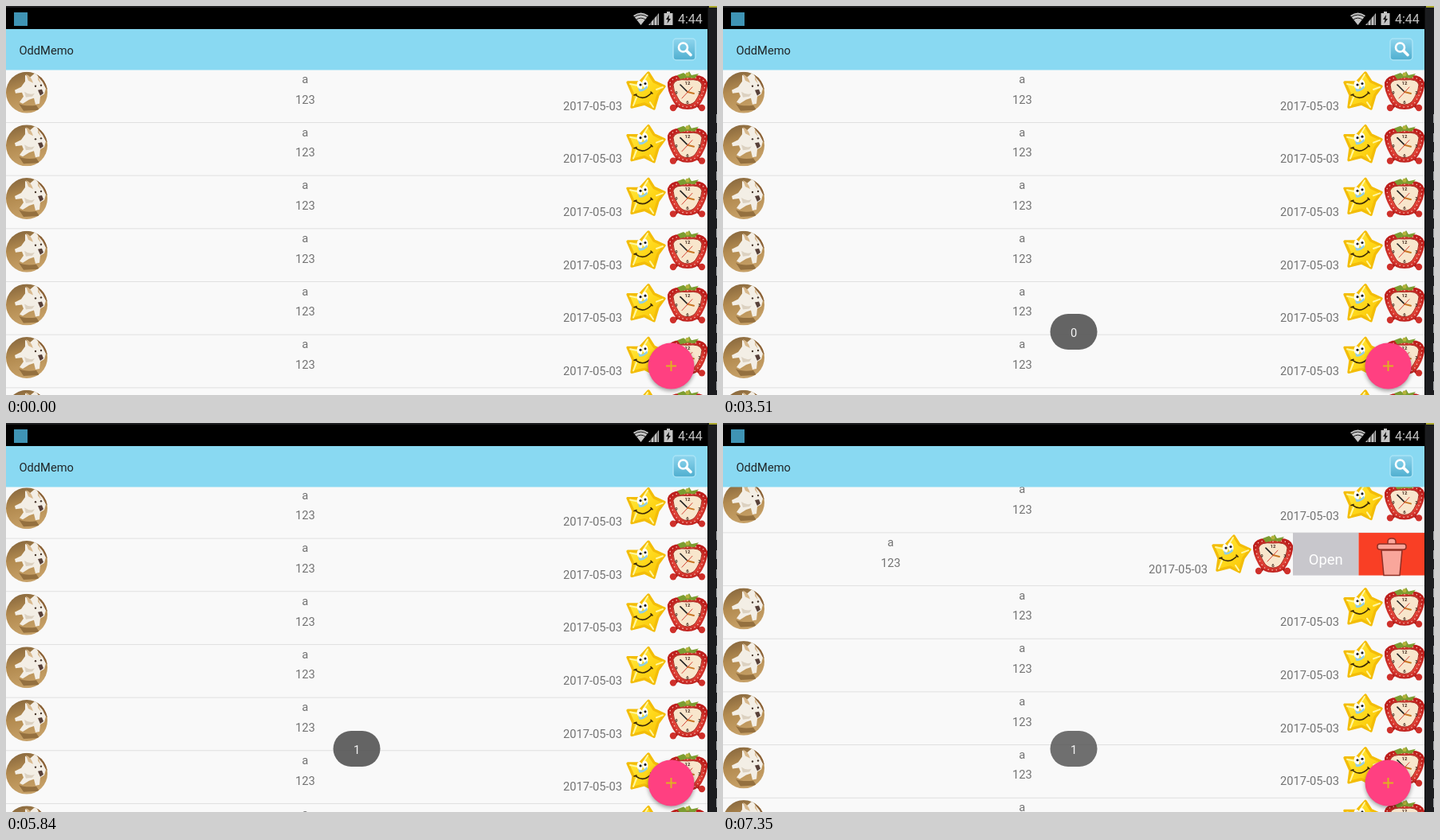
These frames come from a looping animation (892x489 px, 7990 ms). An HTML page:

```html
<!DOCTYPE html>
<html lang="en">
<head>
<meta charset="utf-8">
<title>Note list</title>
<style>
html, body { margin: 0; width: 100%; height: 100%; overflow: hidden; background: #1b1c1f; }
svg { display: block; width: 100%; height: 100%; }
text { font-family: Roboto, Arial, sans-serif; font-size: 14.67px; }
.mid { text-anchor: middle; }
.line { fill: none; stroke-linecap: round; stroke-linejoin: round; }
</style>
</head>
<body>
<svg viewBox="0 0 892 489">
<defs>
  <linearGradient id="ground" x2=".3" y2="1"><stop stop-color="#80613a"/><stop offset=".5" stop-color="#b38b50"/><stop offset="1" stop-color="#c6a067"/></linearGradient>
  <linearGradient id="gold" x2="1" y2="1"><stop stop-color="#ffec4a"/><stop offset=".5" stop-color="#ffd91c"/><stop offset="1" stop-color="#f8c000"/></linearGradient>
  <linearGradient id="glass" x2="0" y2="1"><stop stop-color="#8fd6ee"/><stop offset="1" stop-color="#4faecf"/></linearGradient>
  <radialGradient id="red"><stop offset=".6" stop-color="#e8493c"/><stop offset="1" stop-color="#bd1f1c"/></radialGradient>
  <filter id="soft" x="-30%" y="-30%" width="160%" height="160%"><feGaussianBlur stdDeviation="2.5"/></filter>
  <clipPath id="disc"><circle cx="26" cy="26" r="26"/></clipPath>

  <g id="dog" clip-path="url(#disc)">
    <rect width="52" height="52" fill="url(#ground)"/>
    <path d="M38 0h14v22l-8-6z" fill="#8b6238"/>
    <path d="M16 40q8 4 22 2l4 6-20 1z" fill="#94703f"/>
    <path d="M24 4l6 3 7-6 4 6 5 6 4 8-2 7-5 3-1 9-5 1-2-8-6 2-8 5-4-2 5-7-2-5-8 1-1-4 8-4 5-7z" fill="#f3eee5"/>
    <path d="M25 3q7 3 9 11l-6-3zM40 5l4 10-4-5z" fill="#d8b98e"/>
    <path d="M23 25q7 5 13 2l-3 4-8 1z" fill="#dcd1c0"/>
    <path d="M40 23l5-1 2 5-4 3z" fill="#574038"/>
    <circle cx="37" cy="18" r="1.2" fill="#47372d"/><circle cx="44" cy="17" r="1.2" fill="#47372d"/>
  </g>

  <g id="star">
    <path d="M28 2L35 13 48 19 40 30 35 47 23 41 7 45 9 30 2 14 17 14z" fill="url(#gold)" stroke="#f3bd08" stroke-width="3.4" stroke-linejoin="round"/>
    <path class="line" d="M27 4L20 15M5 16L14 18M9 43L13 33M46 20L38 23M34 45L30 39" stroke="#fff7a3" stroke-width="2"/>
    <ellipse cx="17" cy="17.500" rx="3.400" ry="5.500" fill="#fff" transform="rotate(-10 17 17)"/>
    <ellipse cx="24" cy="16" rx="3.400" ry="5.500" fill="#fff" transform="rotate(-10 24 16)"/>
    <path d="M15 20q4 6 11-2l1 3q-7 6-11 4z" fill="#90cfe5"/>
    <circle cx="18" cy="17" r="1.600" fill="#222"/><circle cx="24" cy="15.500" r="1.600" fill="#222"/>
    <path class="line" d="M12 30q10 8 20-3M10 30l3-1M31 26l2 2" stroke="#3b2a08" stroke-width="1.600"/>
  </g>

  <g id="clock">
    <path d="M13 43l-5 5M39 43l5 5" stroke="#a41b19" stroke-width="4"/>
    <circle cx="8" cy="46" r="4.200" fill="#cf302b"/><circle cx="44" cy="46" r="4.200" fill="#cf302b"/>
    <path d="M26 6Q47 2 51 14 52 24 44 38 39 48 26 48 13 48 8 38 0 24 1 14 5 2 26 6z" fill="url(#red)"/>
    <path class="line" d="M26 9Q45 6 48 15 48 24 41 36 37 45 26 45 15 45 11 36 4 24 4 15 7 6 26 9z" stroke="#f8c7bd" stroke-width="1.500" stroke-dasharray=".1 5"/>
    <path d="M26 11Q42 9 44 17 44 25 38 34 34 42 26 42 18 42 14 34 8 25 8 17 10 9 26 11z" fill="#f8e6cc" stroke="#a52c22"/>
    <path d="M13 5l8-3 4 3 3-5 3 5 9-2-5 6-9-1-9 2z" fill="#7c9d31"/>
    <circle cx="26" cy="4" r="2.500" fill="#b5b33c"/>
    <g class="mid" fill="#4b3126" style="font-weight:700">
      <text x="26" y="17" style="font-size:6px">12</text><text x="41" y="29" style="font-size:6px">3</text>
      <text x="26" y="41" style="font-size:6px">6</text><text x="12" y="29" style="font-size:6px">9</text>
    </g>
    <path class="line" d="M26 26L17 17" stroke="#222" stroke-width="1.600"/>
    <path class="line" d="M26 26L34 28" stroke="#c87624" stroke-width="2"/>
    <path class="line" d="M32 20L19 34" stroke="#d34435"/>
  </g>

  <g id="row">
    <use href="#dog" y="2.700"/>
    <g fill="#737373">
      <text class="mid" x="375.300" y="17">a</text>
      <text class="mid" x="375.300" y="42.700">123</text>
      <text x="699" y="50.500">2017-05-03</text>
    </g>
    <use href="#star" x="778" y="2"/>
    <use href="#clock" x="829" y="2"/>
  </g>
</defs>

<rect width="880" height="489" fill="#f9f9f9"/>
<g id="list">
  <rect id="press" width="880" height="63" fill="#dcdcdc"/>
  <g id="rows"></g>
  <g id="menu">
    <rect width="82.500" height="53.500" fill="#c8c7cc"/>
    <text class="mid" x="41.300" y="39.500" fill="#fff" style="font-size:18.4px">Open</text>
    <rect x="82.500" width="82.500" height="53.500" fill="#f93f25"/>
    <g fill="#f9a69b" stroke="#8f3026" stroke-width="1.500">
      <path d="M119 14v-3q0-4 5-4t5 4v3M111 22l3 31.500h20l3-31.500z"/>
      <rect x="106" y="14" width="36" height="7" rx="3"/>
    </g>
  </g>
</g>
<rect id="bar" x="873" y="85" width="4" height="255" fill="#555"/>

<rect width="880" height="29"/>
<rect width="892" height="2" fill="#1d1e20"/>
<rect x="10" y="8" width="17" height="17" fill="#3f94b5"/>
<g fill="#c4c4c4">
  <path d="M796.500 24L787 12q9.500-7 19 0z"/>
  <path d="M806 24L819 9v15z"/>
  <path d="M829 7h4v2h3.500v15h-11V9h3.500z"/>
  <text x="843" y="22" style="font-size:16px">4:44</text>
</g>
<path class="line" d="M788 14q8.500-6 17 0M791 17q5.500-4 11 0M809 7v18M813 7v18M817 7v18" stroke="#000" stroke-width=".9"/>
<path d="M832 11l-4 6h2.500l-1 5 4.500-6h-2.500z" fill="#111"/>
<rect y="29" width="880" height="51.500" fill="#89d9f2"/>
<text x="16.500" y="61" fill="#202527">OddMemo</text>
<rect x="837" y="41" width="28" height="27" rx="4" fill="url(#glass)" stroke="#a9e4f6" stroke-width="1.500"/>
<circle cx="849.500" cy="52" r="5.500" fill="none" stroke="#fff" stroke-width="2.600"/>
<path class="line" d="M854 56.500l5 5" stroke="#fff" stroke-width="3.600"/>

<circle cx="834.500" cy="455" r="29" fill="#000" opacity=".35" filter="url(#soft)"/>
<circle cx="834.500" cy="452.500" r="29" fill="#ff4081"/>
<path d="M828 452.500h13M834.500 446v13" stroke="#e0b022" stroke-width="2"/>

<g id="toast">
  <rect x="410.500" y="387" width="59" height="45" rx="22.500" fill="#555" fill-opacity=".9"/>
  <text id="count" class="mid" x="440" y="416" fill="#f4f4f4">0</text>
</g>

<rect x="880" width="12" height="489" fill="#1b1c1f"/>
<path d="M880.500 0v489" stroke="#0c0c0d"/>
<path d="M882 1h10" stroke="#a8a52c" stroke-width="2"/>
<path d="M891.500 136v353" stroke="#a0a3a6" stroke-dasharray="11 13"/>
</svg>
<script>
const LOOP = 7990, STEP = 66.67;
const $ = id => document.getElementById(id);

$("rows").innerHTML = Array.from({ length: 8 }, (_, i) =>
  `<g transform="translate(0 ${i * STEP})"><use href="#row"/>
   <rect y="66" width="880" height="1" fill="#e0e0e0"/></g>`).join("");
const swiped = $("rows").children[1].firstElementChild;

// Each track holds [start time, value] pairs; a value lasts until the next start.
const tracks = {
  scroll: [[0, 0], [3990, -.5], [4115, -1], [4240, -1.4], [6230, -15.7], [6340, -8.6]],
  pressed: [[0, -1], [750, 0], [1870, -1], [2510, 0], [3510, -1], [4990, 1], [5840, -1]],
  toast: [[0, 0], [750, .2], [890, .5], [1005, .8], [1120, 1], [4740, .6], [4865, .2],
          [4990, .4], [5115, .8], [5240, 1], [7220, .97], [7350, .93]],
  count: [[0, 0], [4990, 1]],
  bar: [[0, 0], [3990, .5], [4470, .38], [4610, .25], [4740, .12], [4865, 0],
        [6230, .55], [6730, .35], [6855, .15], [6980, 0]],
  swipe: [[0, 0], [6730, 55], [6855, 125], [6980, 165]]
};
const at = (name, t) => tracks[name].findLast(([start]) => start <= t)[1];
const move = (el, x, y) => el.setAttribute("transform", `translate(${x} ${y})`);

function draw(now) {
  const t = now % LOOP, row = at("pressed", t), swipe = at("swipe", t);
  move($("list"), 0, 80 + at("scroll", t));
  move($("press"), 0, row * STEP);
  $("press").setAttribute("opacity", row < 0 ? 0 : 1);
  move(swiped, -swipe, 0);
  move($("menu"), 880 - swipe, STEP);
  $("bar").setAttribute("opacity", at("bar", t));
  $("toast").setAttribute("opacity", at("toast", t));
  $("count").textContent = at("count", t);
  requestAnimationFrame(draw);
}
draw(performance.now());
</script>
</body>
</html>
```
